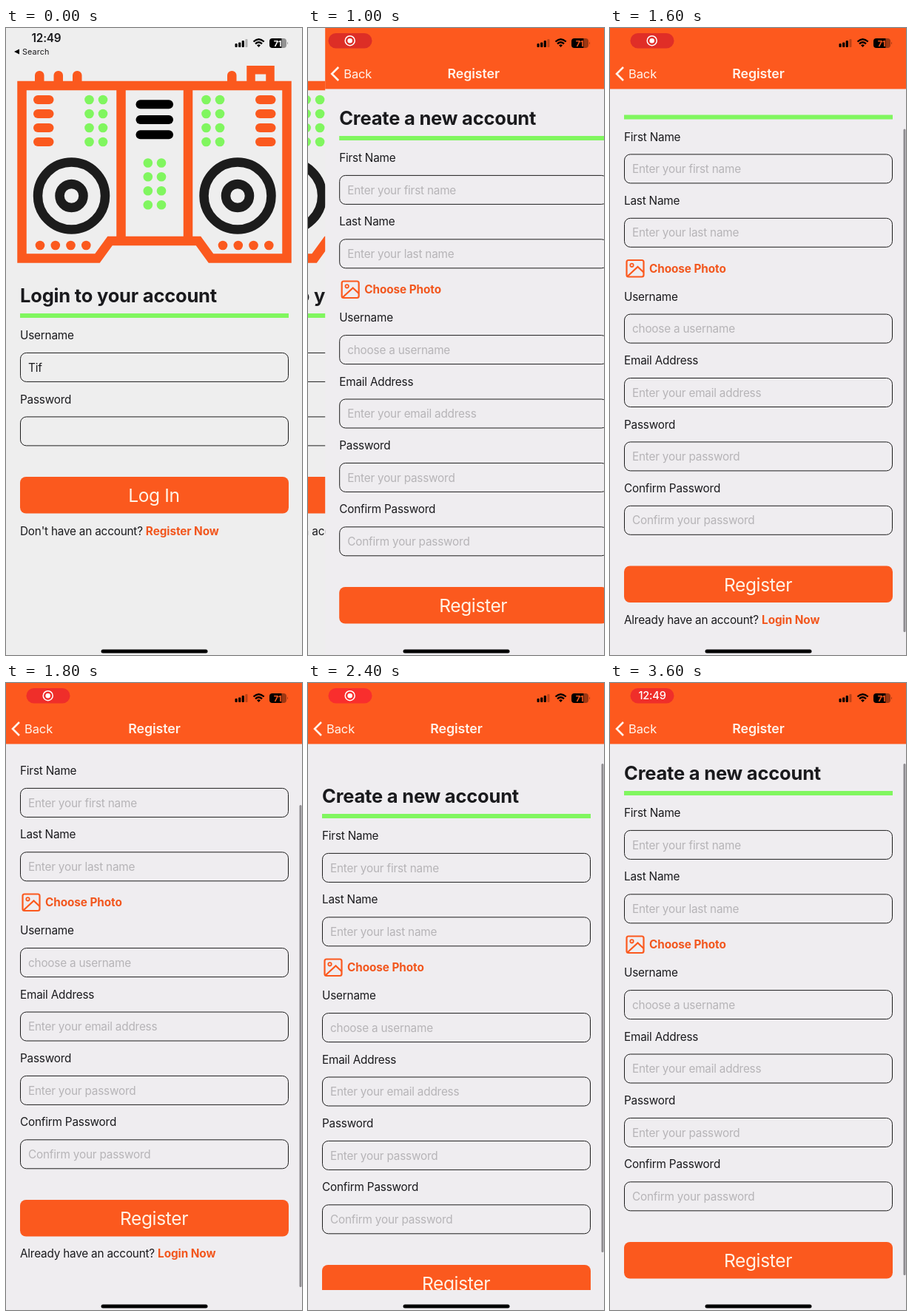
Write an HTML page that moves like this. It is 400 px wide and 848 px high and loops after 3.7 s.

```html
<!DOCTYPE html>
<html lang="en">
<head>
<meta charset="utf-8">
<title>Login and register</title>
<style>
html, body { margin: 0; width: 100%; height: 100%; overflow: hidden; background: #eee; }
svg { display: block; width: 400px; height: 848px; font-family: Inter, "Open Sans", sans-serif; }
text { font-size: 15.3px; letter-spacing: -.2px; fill: #1a1a1d; white-space: pre; }
.title { font-size: 25.5px; font-weight: 700; letter-spacing: -.2px; }
.button { font-size: 24.5px; letter-spacing: -.35px; fill: #fff3e6; text-anchor: middle; }
.hint { fill: #b6b4b7; }
.link { font-weight: 700; letter-spacing: -.06px; fill: #f2561d; }
.nav { font-size: 16.5px; letter-spacing: -.1px; fill: #fff3ea; }
.mid { text-anchor: middle; }
.line { fill: none; stroke: #fb591e; }
</style>
</head>
<body>
<svg viewBox="0 0 400 848">
  <defs><clipPath id="view"><path d="M0 105H400V821H0Z"/></clipPath></defs>
  <g id="login"></g>
  <g id="register">
    <path d="M0 0H400V848H0Z" fill="#efedf0"/>
    <g clip-path="url(#view)"><g id="form"></g></g>
    <rect id="bar" x="396.5" width="3" rx="1.5" fill="#8e8c90"/>
    <path d="M0 0H400V82.6H0Z" fill="#fd591e"/>
    <path d="M18 53L9 62L18 71" fill="none" stroke="#fff3ea" stroke-width="2.6"/>
    <text class="nav" x="25" y="68">Back</text>
    <text class="nav mid" x="200.5" y="68.3" style="font-size:17.8px;font-weight:600">Register</text>
  </g>
  <g id="plain">
    <text class="mid" x="54.5" y="19" style="font-weight:600">12:49</text>
    <path d="M11 32L18 28.5V35.5Z"/>
    <text x="22" y="35.5" style="font-size:10.8px;letter-spacing:.1px">Search</text>
  </g>
  <g id="recording">
    <rect id="pill" x="27.5" y="7" width="59" height="20.5" rx="10.2"/>
    <g id="dot" fill="#fff">
      <circle cx="56.7" cy="17.2" r="6.5" fill="none" stroke="#fff" stroke-width="1.5"/>
      <circle cx="56.7" cy="17.2" r="3.3"/>
    </g>
    <text id="clock" class="mid" x="57" y="22.2" style="font-size:14.6px;font-weight:500;fill:#fff">12:49</text>
  </g>
  <g id="status"></g>
  <rect x="128.5" y="840.5" width="144" height="5" rx="2.5"/>
</svg>
<script>
const $ = id => document.getElementById(id);
const ORANGE = '#fb591e', GREEN = '#80f65f', INK = '#1c1c1c';

const text = (x, y, s, cls = '') => `<text x="${x}" y="${y}" class="${cls}">${s}</text>`;
const rect = (x, y, w, h, r, fill, extra = '') =>
  `<rect x="${x}" y="${y}" width="${w}" height="${h}" rx="${r}" fill="${fill}" ${extra}/>`;
const grid = (xs, ys, draw) => xs.map(x => ys.map(y => draw(x, y)).join('')).join('');
const dots = (xs, ys, fill) => grid(xs, ys, (x, y) => `<circle cx="${x}" cy="${y}" r="6.3" fill="${fill}"/>`);
const pills = (xs, ys, w, fill) => grid(xs, ys, (x, y) => rect(x, y - 6, w, 12, 6, fill));

const heading = (y, s) => text(19, y, s, 'title') + rect(19, y + 15, 363, 6, 0, GREEN);
const field = (y, label, value, cls) => text(19, y, label) +
  rect(19.5, y + 18.4, 362, 39, 8, 'none', `stroke="${INK}"`) + text(30, y + 43.5, value, cls);
const button = (y, s) => rect(19, y, 363, 49.5, 8, ORANGE) + text(200, y + 34, s, 'button');
const footer = (y, s, link) => text(19, y, `${s} <tspan class="link" id="${link.split(' ')[0]}">${link}</tspan>`);

function boombox() {
  const rows = [97, 116, 135, 154];
  const speakers = [88.5, 313].map(x => [[45.5, 12.5], [16, 12.5]].map(([r, w]) =>
    `<circle cx="${x}" cy="227" r="${r}" fill="none" stroke="${INK}" stroke-width="${w}"/>`).join('')).join('');
  return [39, 64.5, 90, 299].map(x => rect(x, 58, 12.5, 22, 6, ORANGE)).join('') +
    `<path class="line" stroke-width="11.5" d="M331 74V56.7H357V74"/>
     <path class="line" stroke-width="12.5" d="M21.5 78H379.5V311.5H277L260 288H140.5L123.5 311.5H21.5ZM155.5 78V288M246 78V288"/>` +
    pills([37, 337], rows, 27.5, ORANGE) + dots([112.5, 131, 270.5, 289], rows, GREEN) +
    pills([175.5], [103.3, 124, 144.3], 50.5, '#000') + dots([191.8, 210], [182.5, 201.3, 220.3, 239.2], GREEN) +
    speakers + dots([46, 66.8, 87.5, 108.3, 293, 313.8, 334.5, 355.3], [294], ORANGE);
}

$('login').innerHTML = rect(0, 0, 400, 848, 0, '#eee') + boombox() +
  heading(371, 'Login to your account') +
  field(421, 'Username', 'Tif') + field(507.5, 'Password', '') +
  button(607, 'Log In') + footer(686, "Don't have an account?", 'Register Now');

$('form').innerHTML = heading(131, 'Create a new account') +
  [[181, 'First Name', 'Enter your first name'],
   [267.4, 'Last Name', 'Enter your last name'],
   [397.2, 'Username', 'choose a username'],
   [483.6, 'Email Address', 'Enter your email address'],
   [570, 'Password', 'Enter your password'],
   [656.4, 'Confirm Password', 'Confirm your password']].map(f => field(...f, 'hint')).join('') +
  rect(22.5, 342.5, 23, 22.5, 2.5, 'none', `stroke="${ORANGE}" stroke-width="2.2"`) +
  `<circle class="line" cx="29.5" cy="349.3" r="2.2" stroke-width="1.8"/>
   <path class="line" stroke-width="2.2" d="M24 364L37.5 351.5L45.5 359"/>` +
  text(53, 359.3, 'Choose Photo', 'link') +
  button(756, 'Register') + footer(834, 'Already have an account?', 'Login Now');

$('status').innerHTML =
  [5, 6.5, 9, 11].map((h, i) => rect(309.5 + i * 4.6, 26 - h, 3.2, h, 1, '#000', i > 2 ? 'opacity=".25"' : '')).join('') +
  `<path fill="none" stroke="#000" stroke-width="2.3" d="M334.5 18.5Q341.5 12 348.7 18.5M337 21.3Q341.5 17.3 346 21.3"/>
   <path d="M339 23.2Q341.5 21.3 344 23.2L341.5 26Z"/>
   <path d="M360 14H372.5V27H360Q356 27 356 23V18Q356 14 360 14Z"/>
   <path opacity=".38" d="M372.5 14H375Q379 14 379 18V23Q379 27 375 27H372.5ZM380 18.5Q382 20.5 380 22.5Z"/>
   <text id="level" class="mid" x="367" y="24.6" style="font-size:11px;font-weight:700">71</text>`;

const smooth = v => (v = Math.min(1, Math.max(0, v)), v * v * (3 - 2 * v));
// Share of the distance left in a critically damped spring
const spring = v => v < 0 ? 1 : (1 + v) * Math.exp(-v);

// Drag up past the end, drag down past the top, then bounce back
function scrollAt(t) {
  if (t < 1800) return 57 * smooth((t - 1400) / 400);
  if (t < 2400) return 57 - 88 * smooth((t - 1800) / 600);
  return -31 * spring((t - 2400) * .013);
}

function draw(t) {
  // Push transition: stiffness 1000, mass 3
  const left = spring((t - 750) / 1000 * Math.sqrt(1000 / 3));
  $('register').setAttribute('transform', `translate(${400 * left})`);
  $('login').setAttribute('transform', `translate(${-122 * (1 - left)})`);
  $('Register').setAttribute('opacity', 1 - .7 * smooth((t - 450) / 150) * (1 - smooth((t - 700) / 200)));

  const y = scrollAt(t), maxY = 17;
  const over = Math.max(0, -y, y - maxY);
  $('form').setAttribute('transform', `translate(0 ${-y})`);
  $('bar').setAttribute('height', 692 - over);
  $('bar').setAttribute('y', 109 + (y > maxY ? 16 + over : Math.max(0, y) * 16 / maxY));

  const recording = t >= 300;
  $('plain').setAttribute('opacity', recording ? 0 : 1);
  $('recording').setAttribute('opacity', recording ? 1 : 0);
  const glow = .5 - .5 * Math.cos((t - 1280) / 1800 * 2 * Math.PI);
  $('pill').setAttribute('fill', `rgb(${212 + 43 * glow},46,${36 + 10 * glow})`);
  const clock = smooth((t - 3050) / 250);
  $('dot').setAttribute('opacity', 1 - clock);
  $('clock').setAttribute('opacity', clock);
  $('level').style.fill = left < .1 ? '#fd591e' : '#fff';
}

const LOOP = 3700, STEP = 100, start = performance.now();
function tick() {
  const t = (performance.now() - start) % LOOP;
  draw(Math.floor(t / STEP) * STEP);
  requestAnimationFrame(tick);
}
tick();
</script>
</body>
</html>
```
